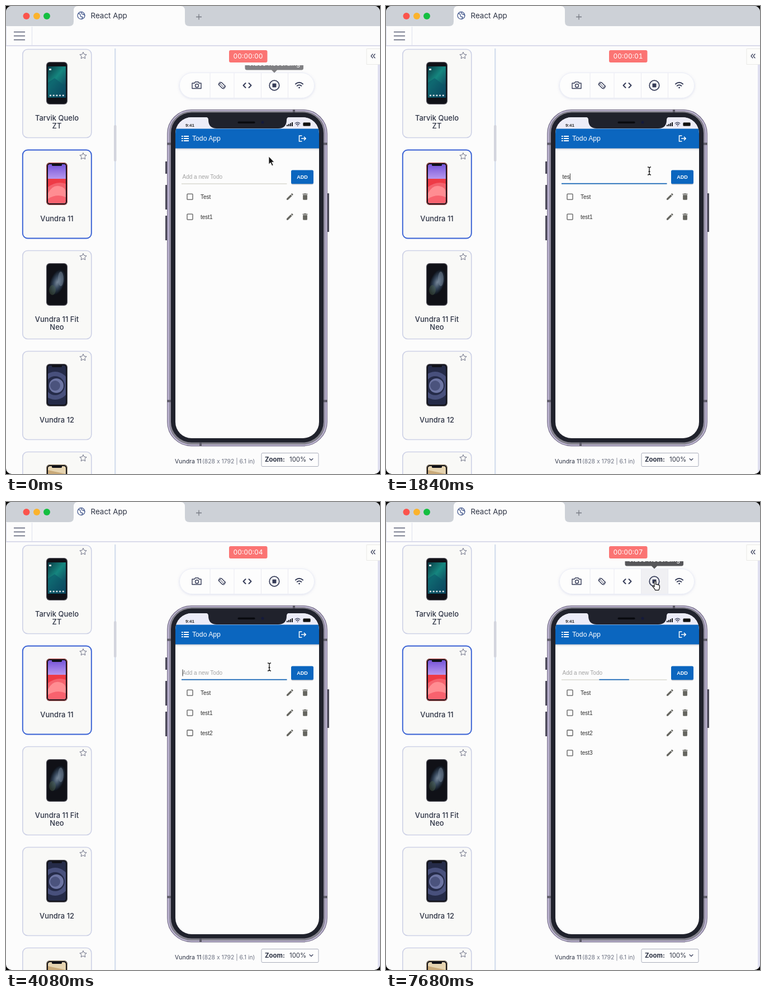
These frames come from a looping animation (669x837 px, 7.72 s). An HTML page:

```html
<!DOCTYPE html>
<html lang="en">
<head>
<meta charset="utf-8">
<title>Device preview</title>
<style>
  html, body { margin: 0; width: 100%; height: 100%; overflow: hidden; background: #000; }
  svg { display: block; width: 669px; height: 837px; }
  text { font-family: Inter, "Open Sans", sans-serif; fill: #2d3344; }
  .app text { font-family: "Liberation Sans", Arial, sans-serif; fill: #2c2c2c; font-size: 10px; }
  .line { fill: none; stroke: #363c58; stroke-width: 1.4; stroke-linecap: round; stroke-linejoin: round; }
  .label { font-size: 13px; font-weight: 500; text-anchor: middle; }
  .app .white { fill: #fff; }
  .app .hint { fill: #a3a3a3; }

  #cursor, #arrow, #beam, #hand, #tip, #hover, #focus, #row3, #row4 {
    animation: 7720ms linear infinite;
  }
  #cursor { animation-name: move; animation-timing-function: ease-in-out; }
  #arrow { animation-name: arrow; }
  #beam { animation-name: beam; }
  #hand { animation-name: hand; }
  #hover { animation-name: hand; }
  #row3 { animation-name: row3; }
  #row4 { animation-name: row4; }
  #arrow, #beam, #hand, #hover, #row3, #row4 { animation-timing-function: step-end; }
  #tip { animation-name: tip; }
  #focus { animation-name: focus; animation-timing-function: ease-out; transform-origin: 408px 318px; }

  @keyframes move {
    0% { transform: translate(470px, 269px); }
    4.7%, 13% { transform: translate(468px, 301px); }
    17%, 89.3% { transform: translate(471px, 295px); }
    96.4%, 100% { transform: translate(480px, 142px); }
  }
  @keyframes arrow { 0% { opacity: 1; } 3.2% { opacity: 0; } 90.2% { opacity: 1; } 94.6%, 100% { opacity: 0; } }
  @keyframes beam { 0% { opacity: 0; } 3.2% { opacity: 1; } 90.2%, 100% { opacity: 0; } }
  @keyframes hand { 0% { opacity: 0; } 94.6%, 100% { opacity: 1; } }
  @keyframes tip { 0% { opacity: .75; } 2%, 94.6% { opacity: 0; } 96.6%, 100% { opacity: 1; } }
  @keyframes focus {
    0%, 5.83% { transform: scaleX(0); }
    8.42%, 98.7% { transform: scaleX(1); }
    100% { transform: scaleX(.1); }
  }
  @keyframes row3 { 0% { opacity: 0; } 38.86%, 100% { opacity: 1; } }
  @keyframes row4 { 0% { opacity: 0; } 76.42%, 100% { opacity: 1; } }
</style>
</head>
<body>
<svg viewBox="0 0 669 837">
  <defs>
    <linearGradient id="teal" x2=".7" y2="1">
      <stop stop-color="#0b3b46"/><stop offset=".45" stop-color="#15867f"/><stop offset="1" stop-color="#0d3a58"/>
    </linearGradient>
    <linearGradient id="violet" x2="0" y2="1">
      <stop stop-color="#7654d8"/><stop offset="1" stop-color="#b99af0"/>
    </linearGradient>
    <linearGradient id="metal">
      <stop stop-color="#a79fbd"/><stop offset=".03" stop-color="#83818c"/>
      <stop offset=".97" stop-color="#83818c"/><stop offset="1" stop-color="#a79fbd"/>
    </linearGradient>
    <radialGradient id="smoke">
      <stop stop-color="#77889a"/><stop offset=".5" stop-color="#35465a"/><stop offset="1" stop-color="#0c1018"/>
    </radialGradient>
    <filter id="soft" x="-10%" y="-40%" width="120%" height="180%">
      <feDropShadow dx="0" dy="1" stdDeviation="2" flood-color="#8890c0" flood-opacity=".25"/>
    </filter>
    <clipPath id="stage"><rect width="669" height="837" rx="10"/></clipPath>
    <clipPath id="below"><rect x="400" y="106" width="160" height="20"/></clipPath>
    <clipPath id="screen"><rect x="303" y="199" width="257" height="574" rx="29"/></clipPath>
    <clipPath id="face"><rect x="75" y="26" width="32" height="70" rx="4"/></clipPath>

    <path id="star" d="M138 5.5l1.8 3.9 4.3.5-3.2 2.9.9 4.2-3.8-2.1-3.8 2.1.9-4.2-3.2-2.9 4.3-.5z"
      fill="none" stroke="#6d7186" stroke-linejoin="round"/>
    <g id="card">
      <rect x="29.8" y=".5" width="123" height="158" rx="9" fill="#f9f9f7" stroke="#cdd1e6" stroke-width="1.6"/>
      <use href="#star"/>
    </g>
    <g id="shell">
      <rect x="72" y="23" width="38" height="76" rx="6" fill="#4d4c55"/>
      <rect x="73.2" y="24.2" width="35.6" height="73.6" rx="5" fill="#101117"/>
    </g>
    <path id="notch" d="M82 25h18v2.500q0 1.500-2 1.500H84q-2 0-2-1.500z" fill="#101117"/>
    <g id="wifi" class="line" style="stroke-width:2">
      <path d="M-6.500-2.500q6.500-5.500 13 0M-3.800.8q3.800-3.200 7.600 0"/>
      <circle cy="4" r=".9" fill="#363c58" stroke-width="1"/>
    </g>
    <g id="row">
      <rect x="324" y="-5" width="10" height="10" rx="1" fill="none" stroke="#5b5b5b" stroke-width="1.3"/>
      <g fill="#666660">
        <path transform="translate(500 -8) scale(.65)" d="M3 17.250V21h3.750L17.810 9.940l-3.750-3.750zM20.710 7.040a1 1 0 0 0 0-1.410l-2.340-2.340a1 1 0 0 0-1.410 0l-1.830 1.830 3.750 3.750z"/>
        <path transform="translate(527.200 -8) scale(.65)" d="M6 19a2 2 0 0 0 2 2h8a2 2 0 0 0 2-2V7H6zM19 4h-3.500l-1-1h-5l-1 1H5v2h14z"/>
      </g>
    </g>
  </defs>

  <g clip-path="url(#stage)">
    <rect width="669" height="837" fill="#fcfcfc"/>

    <!-- browser bar -->
    <rect width="669" height="36" fill="#cdd1d7"/>
    <path d="M113 36q8 0 8-8V8q0-8 8-8h183q8 0 8 8v20q0 8 8 8z" fill="#fcfcfc"/>
    <circle cx="36.500" cy="18" r="6" fill="#fb544c"/>
    <circle cx="55" cy="18" r="6" fill="#fbb32c"/>
    <circle cx="73" cy="18" r="6" fill="#14bf40"/>
    <g fill="none" stroke="#4b5f92" stroke-width="1.300">
      <circle cx="134.500" cy="17" r="6.500"/>
      <path d="M129 13.500q4 0 4 3t3 3-1 4M135 10.500q-1 4 2 4t4 3"/>
    </g>
    <text x="151.500" y="22" font-size="13.400">React App</text>
    <path d="M340 19.500h10M345 14.500v10" stroke="#777b84" stroke-width="1.300"/>

    <!-- header -->
    <path d="M.5 37v33M46.500 37v33" stroke="#dfe1ee"/>
    <path d="M14 46.500h20M14 53.500h20M14 60.500h20" stroke="#545a70" stroke-width="1.500"/>
    <rect y="70" width="669" height="2" fill="#dadbea"/>

    <!-- sidebar -->
    <rect x="194" y="76" width="2.500" height="761" fill="#d6e0ee"/>
    <rect x="193" y="213" width="4.500" height="65" rx="2" fill="#d3d5de"/>
    <g transform="translate(0 77)">
      <use href="#card"/><use href="#shell"/>
      <g clip-path="url(#face)">
        <rect x="75" y="31" width="32" height="56" fill="url(#teal)"/>
        <path d="M75 60l12-8 20 15v20H75z" fill="#0a5568" opacity=".6"/>
        <path d="M78 83h26" stroke="#d7dfe4" stroke-width="2.500" stroke-dasharray="3 2.700"/>
        <rect x="77" y="35" width="4" height="3" fill="#d4e4e4"/>
      </g>
      <text class="label" x="91" y="128">Tarvik Quelo</text>
      <text class="label" x="91" y="142">ZT</text>
    </g>
    <g transform="translate(0 257)">
      <use href="#card"/>
      <rect x="29.800" y=".5" width="123" height="158" rx="9" fill="none" stroke="#3a63d6" stroke-width="1.900"/>
      <use href="#shell"/>
      <rect x="72.500" y="23.500" width="37" height="75" rx="6" fill="none" stroke="#c8504e"/>
      <g clip-path="url(#face)">
        <rect x="75" y="26" width="32" height="70" fill="#f5626d"/>
        <path d="M75 26h32v27H75z" fill="url(#violet)"/>
        <path d="M75 52h32v9q-16-6-32 6z" fill="#ee3b46"/>
        <path d="M75 78q8-15 20-13t12 12v19H75z" fill="#ff8d92"/>
        <path d="M75 88q16-10 32-3v11H75z" fill="#f8626e"/>
      </g>
      <use href="#notch"/>
      <text class="label" x="91" y="128">Vundra 11</text>
    </g>
    <g transform="translate(0 437)">
      <use href="#card"/><use href="#shell"/>
      <g clip-path="url(#face)">
        <ellipse cx="92" cy="57" rx="13" ry="24" fill="url(#smoke)" transform="rotate(20 92 57)"/>
        <ellipse cx="98" cy="51" rx="5" ry="13" fill="#8290a2" opacity=".45"/>
        <ellipse cx="83" cy="71" rx="6" ry="9" fill="#536a52" opacity=".4"/>
      </g>
      <use href="#notch"/>
      <text class="label" x="91" y="128">Vundra 11 Fit</text>
      <text class="label" x="91" y="142">Neo</text>
    </g>
    <g transform="translate(0 617)">
      <use href="#card"/><use href="#shell"/>
      <g clip-path="url(#face)">
        <rect x="75" y="26" width="32" height="70" fill="#252b48"/>
        <circle cx="88" cy="62" r="25" fill="#48507c"/>
        <circle cx="88" cy="62" r="17" fill="#252b49"/>
        <circle cx="90" cy="62" r="13" fill="#6d75a3"/>
        <circle cx="88" cy="62" r="9" fill="#4b537d"/>
      </g>
      <use href="#notch"/>
      <text class="label" x="91" y="128">Vundra 12</text>
    </g>
    <g transform="translate(0 797)">
      <use href="#card"/><use href="#shell"/>
      <rect x="72.500" y="23.500" width="37" height="75" rx="6" fill="none" stroke="#a89572"/>
      <g clip-path="url(#face)">
        <rect x="75" y="26" width="32" height="70" fill="#e6d4b0"/>
        <path d="M75 33l32 7v60H75z" fill="#c9a978"/>
      </g>
      <use href="#notch"/>
    </g>

    <!-- right edge -->
    <rect x="665" y="105" width="4" height="732" fill="#dfdff0"/>
    <path d="M669 76.500h-24v28h24" fill="#fdfdfb" stroke="#e9e9e6"/>
    <path class="line" d="M656 86l-3 3.500 3 3.500M660 86l-3 3.500 3 3.500" style="stroke-width:1.200"/>

    <!-- recorder -->
    <rect x="399" y="79" width="68.500" height="22" rx="3" fill="#fb7473"/>
    <text id="clock" x="433" y="94" text-anchor="middle" font-size="12" style="fill:#fff;font-variant-numeric:tabular-nums">00:00:00</text>

    <rect x="310.500" y="119.500" width="241" height="45" rx="22.500" fill="#fdfdfd" stroke="#eceef7" filter="url(#soft)"/>
    <rect id="hover" x="456.500" y="120" width="47.500" height="44" fill="#f0f0f3"/>
    <path d="M365 120v44M408 120v44M456.500 120v44M504.500 120v44" stroke="#e9eaf1"/>
    <g class="line">
      <path d="M333 138h4l1.500-2.200h5.500l1.500 2.200h3.500v9.500h-16z"/>
      <circle cx="341.500" cy="142.500" r="3"/>
      <rect x="-3.200" y="-5.200" width="6.400" height="10.400" rx="1" transform="translate(386.300 142) rotate(-45)"/>
      <path d="M380 141q0-4 3-5.500M392.500 143q0 4-3 5.500M383 139l6 6" stroke-width="1"/>
      <path d="M428.500 138l-4 4 4 4M434.500 138l4 4-4 4" style="stroke-width:2"/>
      <circle cx="480" cy="142" r="8.800" style="stroke-width:1.700"/>
    </g>
    <rect x="476.500" y="138.500" width="7" height="7" rx="1" fill="#363c58"/>
    <use href="#wifi" x="524.500" y="142"/>
    <g id="tip" clip-path="url(#below)">
      <path d="M427.500 90h104.500v21q0 3.500-3.500 3.500H485l-5 5-5-5h-44q-3.500 0-3.500-3.500z" fill="#57575a"/>
      <text x="479.500" y="107" text-anchor="middle" font-size="12" style="fill:#fff">Video Recording</text>
    </g>

    <!-- handset -->
    <path d="M286.500 278v22M286.500 320v44M286.500 375v44M576.500 335v69" stroke="#4c4a59" stroke-width="3"/>
    <rect x="288.700" y="185.700" width="285.600" height="601" rx="43" fill="url(#metal)" stroke="#7f7891" stroke-width="1.400"/>
    <rect x="290.300" y="187.300" width="282.400" height="598" rx="41.500" fill="none" stroke="#c9c0df" stroke-width="1.600"/>
    <path d="M288 246.500h7M568 246.500h7M288 706.500h7M568 706.500h7M515 185v6M348 781v6" stroke="#5d5a68" stroke-width="4"/>
    <rect x="295" y="190.500" width="273" height="590" rx="37" fill="#20222c"/>
    <g class="app" clip-path="url(#screen)">
      <rect x="303" y="199" width="257" height="575" fill="#fcfcfc"/>
      <rect x="303" y="199" width="257" height="21" fill="#ececf8"/>
      <rect x="303" y="254" width="257" height="1.500" fill="#a9b2c0"/>
      <rect x="303" y="255.500" width="257" height="2" fill="#e6e8ec"/>
      <rect x="303" y="219.500" width="257" height="35" fill="#0b66bf"/>
      <text x="321" y="215.500" style="font-size:8px;font-weight:bold">9:41</text>
      <path d="M503 215v-2.500M506 215v-4M509 215v-5.500M512 215v-7" stroke="#15171e" stroke-width="2"/>
      <use href="#wifi" transform="translate(521.500 211.500) scale(.65)"/>
      <rect x="531.500" y="208.500" width="13" height="6" rx="1.500" fill="#111" stroke="#555" stroke-width=".7"/>
      <path d="M314 233h2.500M318 233h9M314 237h2.500M318 237h9M314 241h2.500M318 241h9" stroke="#fff" stroke-width="2.200"/>
      <text class="white" x="333" y="241" style="font-size:12.200px">Todo App</text>
      <path d="M529.500 232h-5v10h5M528 237h8M533 233.800l3.200 3.200-3.200 3.200" fill="none" stroke="#fff" stroke-width="1.500"/>

      <text id="entry" x="315.500" y="309"></text>
      <rect id="caret" y="299.500" width="1" height="12" fill="#333"/>
      <rect x="314" y="317.500" width="188.500" height="1" fill="#c9c9bd"/>
      <rect id="focus" x="314" y="316.800" width="188.500" height="1.700" fill="#1466ba"/>
      <rect x="510" y="295" width="40" height="24.500" rx="3" fill="#b9bfca"/>
      <rect x="510" y="293.500" width="40" height="24.500" rx="2.500" fill="#0b66bf"/>
      <text class="white" x="530" y="309" text-anchor="middle" style="font-size:9px;font-weight:bold">ADD</text>

      <g transform="translate(0 341.200)"><use href="#row"/><text x="348" y="3.500">Test</text></g>
      <g transform="translate(0 377.100)"><use href="#row"/><text x="348" y="3.500">test1</text></g>
      <g id="row3"><g transform="translate(0 413)"><use href="#row"/><text x="348" y="3.500">test2</text></g></g>
      <g id="row4"><g transform="translate(0 448.900)"><use href="#row"/><text x="348" y="3.500">test3</text></g></g>
    </g>
    <path d="M357 198.500q5 .5 5 5 0 15.500 15 15.500h110q15 0 15-15.500 0-4.500 5-5z" fill="#20222c"/>
    <rect x="414.500" y="206.500" width="31" height="3.500" rx="1.700" fill="#090a0f"/>
    <circle cx="459" cy="208" r="2.500" fill="#151a3c"/>

    <!-- footer -->
    <text x="302" y="818" font-size="10.500">Vundra 11</text>
    <text x="351" y="818" font-size="10.400" style="fill:#6f7484">(828 x 1792 | 6.1 in)</text>
    <rect x="457" y="799.500" width="102" height="24" rx="2" fill="#fdfdfd" stroke="#a9adba"/>
    <text x="463" y="815" font-size="11.400" font-weight="700">Zoom:</text>
    <text x="507" y="815" font-size="11.400">100%</text>
    <path class="line" d="M543 809.500l3 3 3-3" style="stroke-width:1.100"/>

    <g id="cursor">
      <path id="arrow" d="M0 0v14.200l3.200-3 2.600 5.600 2.300-1-2.500-5.500h4.200z" fill="#111" stroke="#fff" stroke-width=".8"/>
      <path id="beam" d="M-3-7q3 0 3 2v10q0 2-3 2M3-7q-3 0-3 2M0 5q0 2 3 2M-1.500 1h3" fill="none" stroke="#111" stroke-width="1.300"/>
      <path id="hand" d="M0 0q1.500-1.500 2.600 0v5.500q1-1 2.400.3 1.300-.8 2.300.6 1.800-.5 2 1.200v4l-1.500 4H1.500l-1-2.300-3.300-4q-.4-2 1.200-1.500L0 9.500z" fill="#fff" stroke="#111" stroke-width="1.200" stroke-linejoin="round"/>
    </g>
  </g>
</svg>
<script>
  const LOOP = 7720, HINT = 'Add a new Todo';
  const [clock, entry, caret] = ['clock', 'entry', 'caret'].map(id => document.getElementById(id));

  const typing = (word, times) => times.map((at, i) => [at, word.slice(0, i + 1)]);
  // Each edit is [time, field text]; null means the field has no focus.
  const edits = [
    [0, null], [450, ''],
    ...typing('test2', [1500, 1660, 1820, 1960, 2200]), [3000, ''],
    ...typing('test3', [4400, 4540, 4680, 4820, 5000]), [5900, ''],
    [7620, null]
  ];

  let start;
  function draw(now) {
    start ??= now;
    const t = (now - start) % LOOP;
    clock.textContent = '00:00:0' + Math.floor(t / 1000);

    const [at, text] = edits.findLast(edit => edit[0] <= t);
    entry.textContent = text || HINT;
    entry.setAttribute('class', text ? '' : 'hint');
    const lit = text !== null && (t - at) % 1000 < 500;
    caret.setAttribute('opacity', lit ? 1 : 0);
    caret.setAttribute('x', 315.5 + (text ? entry.getComputedTextLength() : 0));
    requestAnimationFrame(draw);
  }
  requestAnimationFrame(draw);
</script>
</body>
</html>
```
